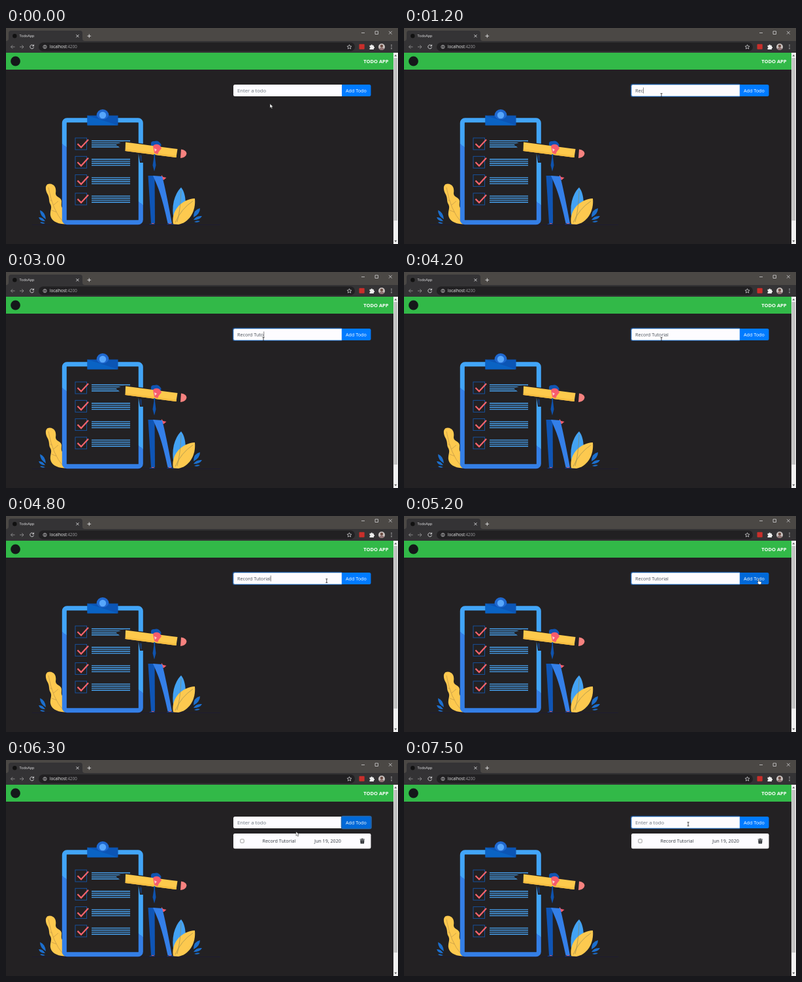
An HTML page for the animation above (8 s loop, 600x332 px).

```html
<!DOCTYPE html>
<html lang="en">
<head>
<meta charset="utf-8">
<title>TodoApp</title>
<style>
html, body { margin: 0; width: 100%; height: 100%; overflow: hidden; background: #232123; }
svg { display: block; width: 100vw; height: 100vh; }
text { font-family: "Open Sans", "Noto Sans", sans-serif; font-size: 7.2px; white-space: pre; }
.line { fill: none; stroke: #e4e4e6; stroke-width: .9; }
.dark { fill: #495057; }
</style>
</head>
<body>
<svg viewBox="0 0 600 332">
  <defs>
    <linearGradient id="frame" gradientUnits="userSpaceOnUse" x1="195" y1="163" x2="101" y2="287">
      <stop offset=".5" stop-color="#42a5f8"/><stop offset=".5" stop-color="#347fe6"/>
    </linearGradient>
    <clipPath id="face"><circle cx="575" cy="29" r="5"/></clipPath>
    <g id="task">
      <rect x="106" y="169" width="17.5" height="18" fill="none" stroke="#1455a8" stroke-width=".9"/>
      <path d="M109.500 178l5.500 5.500L126 171.500" fill="none" stroke="#f9646d" stroke-width="2.200"/>
      <path d="M131 173.500h59m-59 3.100h59m-59 3.100h59m-59 3.100h59" stroke="#48a5f5" stroke-width="1.400"/>
    </g>
  </defs>

  <!-- Browser window -->
  <rect width="600" height="38" fill="#4b4845"/>
  <path d="M0 20q4 0 4-4V8q0-4 4-4H113q4 0 4 4v8q0 4 4 4H600V38H0z" fill="#343335"/>
  <rect x="50" y="22.300" width="484" height="13.500" rx="6.700" fill="#212022"/>
  <circle cx="13.300" cy="12.300" r="3.200" fill="#111"/>
  <text x="20.500" y="14.300" fill="#e8e8ea" style="font-size:5.500px">TodoApp</text>
  <g class="line">
    <path d="M107.500 10.300l4 4m0-4l-4 4M124.500 12.300h5.600m-2.800-2.800v5.600"/>
    <path d="M544 7.500h5M565 5h4.500v4.500h-4.500zM586 4.900l4.700 4.700m0-4.700l-4.700 4.700" stroke-width=".7"/>
    <path d="M13.500 29H7.500m2.700-2.700l-2.700 2.700 2.700 2.700M21 29h6m-2.700-2.700l2.700 2.700-2.700 2.700" stroke="#929294"/>
    <path d="M41.800 26.900a2.900 2.900 0 1 0 .7 2.700M42.500 25.500v2.300h-2.300"/>
    <circle cx="59.500" cy="29" r="2.600" stroke-width=".7"/>
    <path d="M59.500 28.500v2.100m0-3.500v.8"/>
    <path d="M525.500 25.700l1 2.200 2.400.2-1.800 1.600.5 2.400-2.100-1.300-2.100 1.300.5-2.400-1.800-1.600 2.400-.2z" stroke-width=".7"/>
  </g>
  <text x="67" y="31.100" fill="#f0f0f0" style="font-size:6.200px">localhost<tspan fill="#a0a0a3">:4200</tspan></text>
  <rect x="540.500" y="24.700" width="8.200" height="8" rx="1" fill="#c92f2b"/>
  <path d="M556.500 26.700h2a1.200 1.200 0 0 1 2.400 0h2v2a1.200 1.200 0 0 1 0 2.400v2h-6.400v-2.200a1 1 0 0 0 0-2z" fill="#eee"/>
  <g clip-path="url(#face)">
    <path d="M570 24h11v11h-11z" fill="#c9c2c0"/>
    <circle cx="575" cy="27.700" r="2.200" fill="#6c4c43"/>
    <ellipse cx="575" cy="33.700" rx="4" ry="3.400" fill="#8d6f70"/>
  </g>
  <path d="M590 25.700v1.200m0 1.500v1.200m0 1.500v1.200" stroke="#ddd" stroke-width="1.200"/>

  <!-- Page header and scroll bar -->
  <rect y="38" width="593" height="26" fill="#32b948"/>
  <circle cx="14.500" cy="51" r="7.400" fill="#15181a"/>
  <text x="585.500" y="53.900" fill="#fff" text-anchor="end" style="font-size:7.500px;font-weight:700">TODO APP</text>
  <rect x="593" y="38" width="7" height="294" fill="#f1f1f1"/>
  <rect x="593.500" y="46" width="5.500" height="250" fill="#c1c1c1"/>
  <path d="M594.300 43.500l2-2.500 2 2.500zM594.300 326.500l2 2.500 2-2.500z" fill="#555"/>

  <!-- Plants -->
  <path d="M40 302.500H328" stroke="#1d1b30"/>
  <path d="M90 301.500C76 301 69 295 68 288 67 281 71 277 68 271 65 266 67 262 64 256 59 248 60 239 67 239.500 76 240 77 248 76 254 76 261 84 259 85 266 85 272 83 276 90 279z" fill="#fdc94f"/>
  <path d="M65 245Q71 280 88 299M70 266l-3-2M73 272l7-6M77 283l-7-3" fill="none" stroke="#b48e45" stroke-width=".6"/>
  <g fill="#1c6fce">
    <path d="M61 294q-1-11-9-14 0 9 9 14zM60 297q-4-7-10-6 2 6 10 6zM60 300q-6-3-8-1 4 3 8 1z"/>
    <path d="M287 291q0-12 10-14 0 9-10 14zM287 295q4-7 13-6-3 6-13 6zM288 298q5-3 9-1-4 3-9 1z"/>
  </g>
  <path d="M259 301C252 282 255 258 268 245 277 255 278 284 265 301z" fill="#43a2f3"/>
  <path d="M256 301.500C252 282 268 263 289 262 291 281 281 299 264 302z" fill="#fdc94f"/>
  <path d="M268 250q-1 30-6 48M286 266q-18 12-27 33" fill="none" stroke="#8b8350" stroke-width=".6"/>

  <!-- Clipboard -->
  <rect x="89.300" y="141.800" width="117" height="157" rx="4" fill="#232123" stroke="url(#frame)" stroke-width="7"/>
  <circle cx="148" cy="134.500" r="9.500" fill="#1f68cf"/>
  <circle cx="148" cy="134" r="5.200" fill="#57a6fb"/>
  <path d="M124.500 134.500h14q3 6 9.500 6t9.500-6h14v15h-47z" fill="#0b55b5"/>
  <path d="M124.500 134.500l47 15h-47z" fill="#0a63c4"/>
  <use href="#task"/><use href="#task" y="28.300"/><use href="#task" y="56.600"/><use href="#task" y="84.900"/>

  <!-- Figure with pencil -->
  <path d="M168 178.500l14-4.500 29 4v29h-6l-2-13-21-3z" fill="#232123"/>
  <path d="M205.500 195l2 1v10q-3-3-2-11z" fill="#163f7d"/>
  <path d="M222 180q-1-7 5-6 6-2 9 3 3 2 0 7l-3 6-8-3z" fill="#1054b2"/>
  <path d="M183 175.500l79.500 10.500-2 13L182.500 189z" fill="#fdc94c"/>
  <path d="M183 186.500l78 10-.4 2.500L182.500 189z" fill="#f6bd40"/>
  <path d="M268 186.500q8 1 8.500 6.500-1 6-9.500 7z" fill="#f7827f"/>
  <path d="M225 181q4-4 10-1l3 5-4 5-2 4-5-2-1-5z" fill="#f85c6c"/>
  <path d="M227 185l4 2-3 3z" fill="#fbd0d0"/>
  <path d="M226 194h2.500l-.5 4 1.500 13-2.500 9.500-2.500-9.500 2-13z" fill="#0f53ae"/>
  <path d="M238 226l2.500 3 5 1-4 3.500-4-1z" fill="#f85c6c"/>
  <path d="M217.500 227h10l.5 73h-6z" fill="#0f55b5"/>
  <path d="M225 227l14 1q5 18 15 72h-6.500q-9-42-17-60z" fill="#347fe8"/>
  <path d="M222 300h5l1 2h-9zM248 300h6l3 2h-11z" fill="#123f85"/>
  <path d="M223 300h3.500v1h-3.500zM249 300h4v1h-4z" fill="#d75668"/>

  <!-- Form -->
  <rect id="inputRing" x="347.400" y="86.400" width="167" height="19" rx="2.500" fill="none" stroke="#1c4b86" stroke-width="1.300"/>
  <path d="M514 87h-163.500q-2.500 0-2.500 2.500v13q0 2.500 2.500 2.500H514z" fill="#fdfcff"/>
  <path id="inputEdge" d="M514 87.300h-163.500q-2.200 0-2.200 2.200v13q0 2.200 2.200 2.200H514z" fill="none" stroke="#5f9fe8" stroke-width=".6"/>
  <path id="button" d="M514 87h42q2.500 0 2.500 2.500v13q0 2.500-2.500 2.500h-42z"/>
  <rect id="buttonRing" x="513.500" y="86.500" width="45.500" height="19" rx="2.500" fill="none" stroke="#2468b0" stroke-width="1.600"/>
  <text x="520" y="98.900" fill="#fff">Add Todo</text>
  <text id="hint" x="354" y="98.900" fill="#6c757d" style="font-size:7.700px">Enter a todo</text>
  <text id="value" class="dark" x="354" y="98.900"></text>
  <path id="caret" d="M354.500 91.500v9" stroke="#333" stroke-width=".6"/>

  <g id="row">
    <rect x="348" y="113" width="210.500" height="23.300" rx="2.300" fill="#fdfcff"/>
    <rect x="358.800" y="121.800" width="5.400" height="5.400" rx="1" fill="#fff" stroke="#777" stroke-width=".7"/>
    <text x="392.500" y="127.200" fill="#343a40">Record Tutorial</text>
    <text x="472" y="127.200" fill="#343a40">Jun 19, 2020</text>
    <path d="M541.700 121.500h2l.6-.8h2l.6.8h2v1h-7.200zM542.200 123.200h6.200l-.4 5.300h-5.400z" fill="#212529"/>
    <path d="M544 124.200v3.300m1.300-3.300v3.300m1.300-3.300v3.300" stroke="#aaa" stroke-width=".4"/>
  </g>

  <!-- Pointer shapes, each drawn around its hot spot -->
  <g id="pointer" stroke-width=".5">
    <path id="arrow" d="M0 0v6.300l1.500-1.300 1 2.300 1.200-.5-1-2.200h2z" fill="#fff" stroke="#222"/>
    <path id="beam" d="M-1.500-2.800h3M0-2.800v5.600M-1.500 2.800h3" stroke="#222" stroke-width=".8"/>
    <path id="hand" d="M-.7 0q.7-.8 1.400 0v2.700l3 .7q.8.300.7 1.200l-.5 3H.2L-2.200 4.300q.5-.9 1.500.2z" fill="#fff" stroke="#222"/>
  </g>
</svg>
<script>
const $ = id => document.getElementById(id);
const LOOP = 8000, WORDS = "Record Tutorial";
const TYPE_START = 578, KEY_GAP = 204;
const CLICK_INPUT = 600, CLICK_ADD = 5400, ADDED = 5490, CLICK_AGAIN = 6960;

// time, x, y of the pointer
const path = [
  [100, 404, 116.5], [500, 394, 103.5], [4500, 394, 103.5], [5000, 542.7, 97.5],
  [5600, 542.7, 97.5], [6200, 444, 110], [6300, 444, 110], [6400, 437, 117],
  [6500, 426, 119], [6600, 427, 108], [6700, 435, 98.5]
];

const clamp = v => Math.min(1, Math.max(0, v));
const fade = (t, start) => clamp((t - start) / 150);
const show = (id, on) => $(id).style.opacity = +on;

function pointerAt(t) {
  const i = path.findIndex(p => p[0] > t);
  if (i < 0) return path[path.length - 1].slice(1);
  const b = path[i], a = path[i - 1] || b;
  let k = a === b ? 0 : (t - a[0]) / (b[0] - a[0]);
  if (b[0] - a[0] > 100) k = k * k * (3 - 2 * k);
  return [a[1] + (b[1] - a[1]) * k, a[2] + (b[2] - a[2]) * k];
}

function draw(t) {
  const [x, y] = pointerAt(t);
  const inForm = x > 348 && x < 558 && y > 87 && y < 105;
  const hand = inForm && x > 514, beam = inForm && !hand;
  $("pointer").setAttribute("transform", `translate(${x} ${y})`);
  show("hand", hand);
  show("beam", beam);
  show("arrow", !inForm);

  const buttonFocus = fade(t, CLICK_ADD) - fade(t, CLICK_AGAIN);
  const inputFocus = fade(t, CLICK_INPUT) - buttonFocus;
  show("inputRing", inputFocus);
  show("inputEdge", inputFocus);
  show("buttonRing", buttonFocus);
  const shade = hand ? 1 : buttonFocus;
  $("button").setAttribute("fill", `rgb(0 ${123 - 18 * shade} ${255 - 38 * shade})`);

  const added = t >= ADDED;
  const keys = Math.min(WORDS.length, Math.max(0, Math.floor((t - TYPE_START) / KEY_GAP)));
  const value = $("value");
  value.textContent = added ? "" : WORDS.slice(0, keys);
  show("hint", added || !keys);
  show("row", added);

  // The caret restarts its blink at each key or click
  const last = t >= 7000 ? 7000 : keys ? TYPE_START + keys * KEY_GAP : CLICK_INPUT;
  const focused = t >= CLICK_INPUT && t < CLICK_ADD || t >= 7000;
  show("caret", focused && (t - last) % 1000 < 500);
  const width = value.textContent ? value.getComputedTextLength() : 0;
  $("caret").setAttribute("transform", `translate(${width} 0)`);
}

const start = performance.now();
function tick(now) {
  draw(Math.max(0, now - start) % LOOP);
  requestAnimationFrame(tick);
}
draw(0);
requestAnimationFrame(tick);
</script>
</body>
</html>
```
